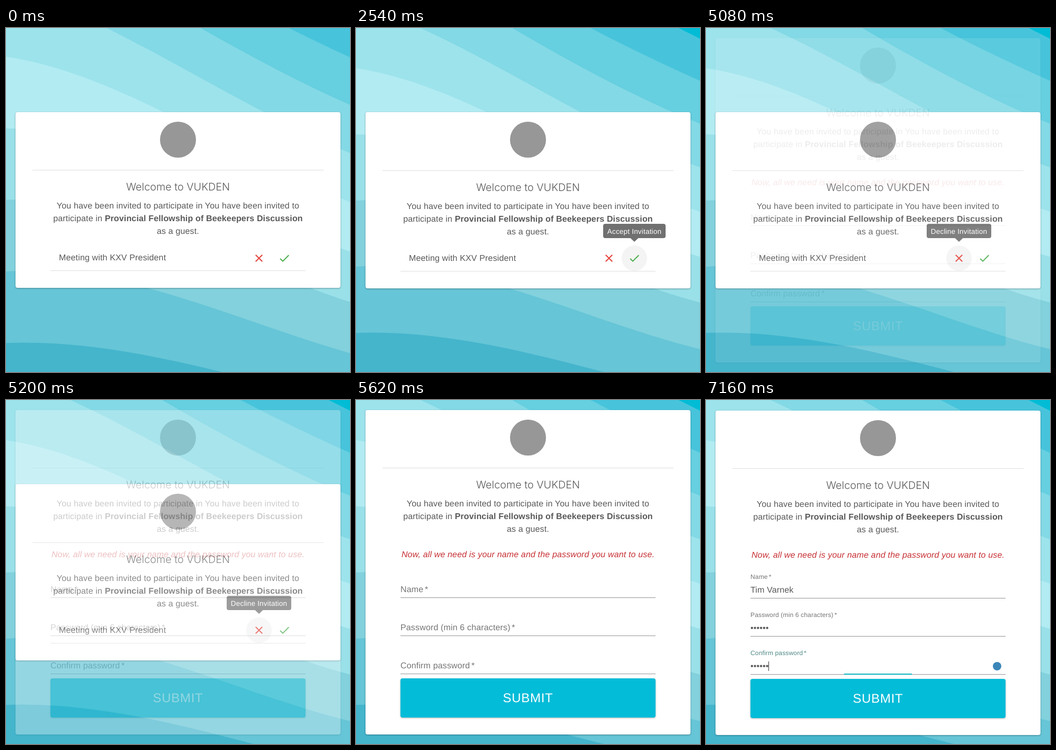
These frames come from a looping animation (650 by 650 pixels, 9.16 s). An HTML page:

```html
<!DOCTYPE html>
<html lang="en">
<head>
<meta charset="utf-8">
<title>Guest invitation</title>
<style>
  html, body { margin: 0; width: 100%; height: 100%; overflow: hidden; }
  svg {
    display: block; width: 650px; height: 650px;
    font: 16px "Liberation Sans", Arial, sans-serif;
    letter-spacing: .00938em;
    text-rendering: geometricPrecision;
  }
  text { fill: #585858; white-space: pre; }
  .mid { text-anchor: middle; }
  .title { font: 300 19.8px Inter, "Liberation Sans", sans-serif; letter-spacing: 0; }
  .bold { font-weight: 700; }
  .note { font-style: italic; fill: #c62f33; }
  .label { fill: #757575; }
  .small { font-size: 12px; }
  .focus { fill: #4f8986; }
  .tip { font-size: 13.5px; letter-spacing: .2px; fill: #fff; }
  .submit { font-size: 24px; letter-spacing: .02857em; fill: #fff; }
  .card { fill: #fff; filter: drop-shadow(0 1px 1.5px rgba(0,0,0,.32)); }
  .button { fill: #03bcd8; filter: drop-shadow(0 1.5px 1.5px rgba(0,0,0,.3)); }
</style>
</head>
<body>
<svg id="stage" viewBox="0 0 650 650"></svg>
<script>
const SIZE = 650, LOOP = 9160;
const FIRST_FADE = 2000, FADE_EVERY = 1540, STEP = 60, STEPS = 10;

const UPPER = ['#9de3ec', '#83d9e5', '#66cfe0', '#47c4db', '#02bcd6'];
const LOWER = ['#9ae0e8', '#82d1dd', '#66c5d6', '#45b5cc'];

const rect = (x, y, w, h, attrs) =>
  `<rect x="${x}" y="${y}" width="${w}" height="${h}" ${attrs}/>`;
const circle = (x, y, r, fill) => `<circle cx="${x}" cy="${y}" r="${r}" fill="${fill}"/>`;
const text = (x, y, cls, str) => `<text x="${x}" y="${y}" class="${cls}">${str}</text>`;
const rule = (x, y, w, fill) => rect(x, y, w, 1, `fill="${fill}"`);
const icon = (x, y, fill, d) => `<path transform="translate(${x - 12} ${y - 12})" fill="${fill}" d="${d}"/>`;

// Wave edge k, counted downwards; the palest band lies between edges 0 and 1
function wave(k, fill, side) {
  const left = 76 + 125 * k;
  const c1 = 108 + 91 * k + 6 * k * k;
  const c2 = 278 + 92 * k;
  const right = 347 + 84.5 * k + 0.7 * k * k;
  return `<path fill="${fill}" d="M0 ${left}C${SIZE / 3} ${c1} ${SIZE * 2 / 3} ${c2} ${SIZE} ${right}V${side}H0Z"/>`;
}

function waves(scale) {
  const shift = -342 * (scale - 1);
  return rect(0, 0, SIZE, SIZE, 'fill="#b2ebf2"') +
    `<g transform="translate(0 ${shift}) scale(${scale})">` +
    UPPER.map((fill, i) => wave(-i, fill, -SIZE)).join('') +
    LOWER.map((fill, i) => wave(i + 1, fill, 2 * SIZE)).join('') + '</g>';
}

// Card with emblem, heading and invitation; dy shifts the lines below the emblem
function card(top, height, dy) {
  const y = top + dy;
  return rect(18, top, 614, height, 'rx="4" class="card"') +
    circle(325, top + 52, 34, '#979797') +
    rule(50, y + 109, 550, '#dedede') +
    text(325, y + 148, 'mid title', 'Welcome to VUKDEN') +
    text(325, y + 182, 'mid', 'You have been invited to participate in You have been invited to') +
    text(325, y + 206, 'mid',
      'participate in <tspan class="bold">Provincial Fellowship of Beekeepers Discussion</tspan>') +
    text(325, y + 230, 'mid', 'as a guest.');
}

function tooltip(x, w, str) {
  return circle(x, 435, 24, '#f4f4f4') +
    rect(x - w / 2, 370, w, 27, 'rx="4" fill="#707070"') +
    `<path fill="#707070" d="M${x - 8} 396.5H${x + 8}L${x} 404Z"/>` +
    text(x, 388.5, 'mid tip', str);
}

function invite(scale, dy, tip = '') {
  return waves(scale) + card(159, 332 + dy, dy) +
    text(100, 439 + dy, '', 'Meeting with KXV President') +
    rule(84, 458 + dy, 482, '#dedede') + tip +
    icon(478, 435, '#e5443c', 'M19 6.41 17.59 5 12 10.59 6.41 5 5 6.41 10.59 12 5 17.59 6.41 19 12 13.41 17.59 19 19 17.59 13.41 12z') +
    icon(526, 435, '#4caf50', 'M9 16.17 4.83 12l-1.42 1.41L9 19 21 7l-1.41-1.41z');
}

const FIELDS = ['Name', 'Password (min 6 characters)', 'Confirm password'];
const VALUES = ['Tim Varnek', '••••••', '••••••'];

function form(dy, filled) {
  const fields = FIELDS.map((name, i) => {
    const y = 363 + dy + i * 72;
    const cls = 'label' + (filled ? ' small' : '') + (filled && i === 2 ? ' focus' : '');
    const label = text(84, filled ? y - 26 : y, cls, `${name}<tspan dx="${filled ? 2 : 2.7}">*</tspan>`);
    const value = filled ? text(84, y, '', VALUES[i]) : '';
    return label + value + rule(84, y + 10, 482, '#949494');
  }).join('');
  const focus = filled
    ? rect(118, 494, 1, 18, 'fill="#333"') +
      rect(261, 517, 128, 2, 'fill="#0bb3c0"') +
      circle(550, 503, 8, '#3b86b8')
    : '';
  return waves(1) + card(19 + dy, 613, 0) +
    text(325, 297 + dy, 'mid note', 'Now, all we need is your name and the password you want to use.') +
    fields + focus +
    rect(84, 526 + dy, 482, 74, 'rx="4" class="button"') +
    text(325, 571 + dy, 'mid submit', 'SUBMIT');
}

const stage = document.getElementById('stage');
stage.innerHTML = [
  invite(1.082, 0),
  invite(1, 1, tooltip(526, 118, 'Accept Invitation')),
  invite(1, 1, tooltip(478, 122, 'Decline Invitation')),
  form(0, false),
  form(1, true)
].map(s => `<g>${s}</g>`).join('');
const scenes = [...stage.children];

// Each scene dissolves over the one before it in equal steps
function opacity(i, t) {
  if (i === 0) return 1;
  const begin = FIRST_FADE + (i - 1) * FADE_EVERY;
  const k = Math.floor((t - begin) / STEP) + 1;
  return Math.min(Math.max(k / STEPS, 0), 1);
}

function draw(t) {
  const alpha = scenes.map((_, i) => opacity(i, t));
  const base = alpha.lastIndexOf(1);
  scenes.forEach((g, i) => {
    g.style.display = i < base || alpha[i] === 0 ? 'none' : '';
    g.style.opacity = alpha[i];
  });
}

const start = performance.now();
function tick(now) {
  draw(Math.max(0, now - start) % LOOP);
  requestAnimationFrame(tick);
}
draw(0);
requestAnimationFrame(tick);
</script>
</body>
</html>
```
